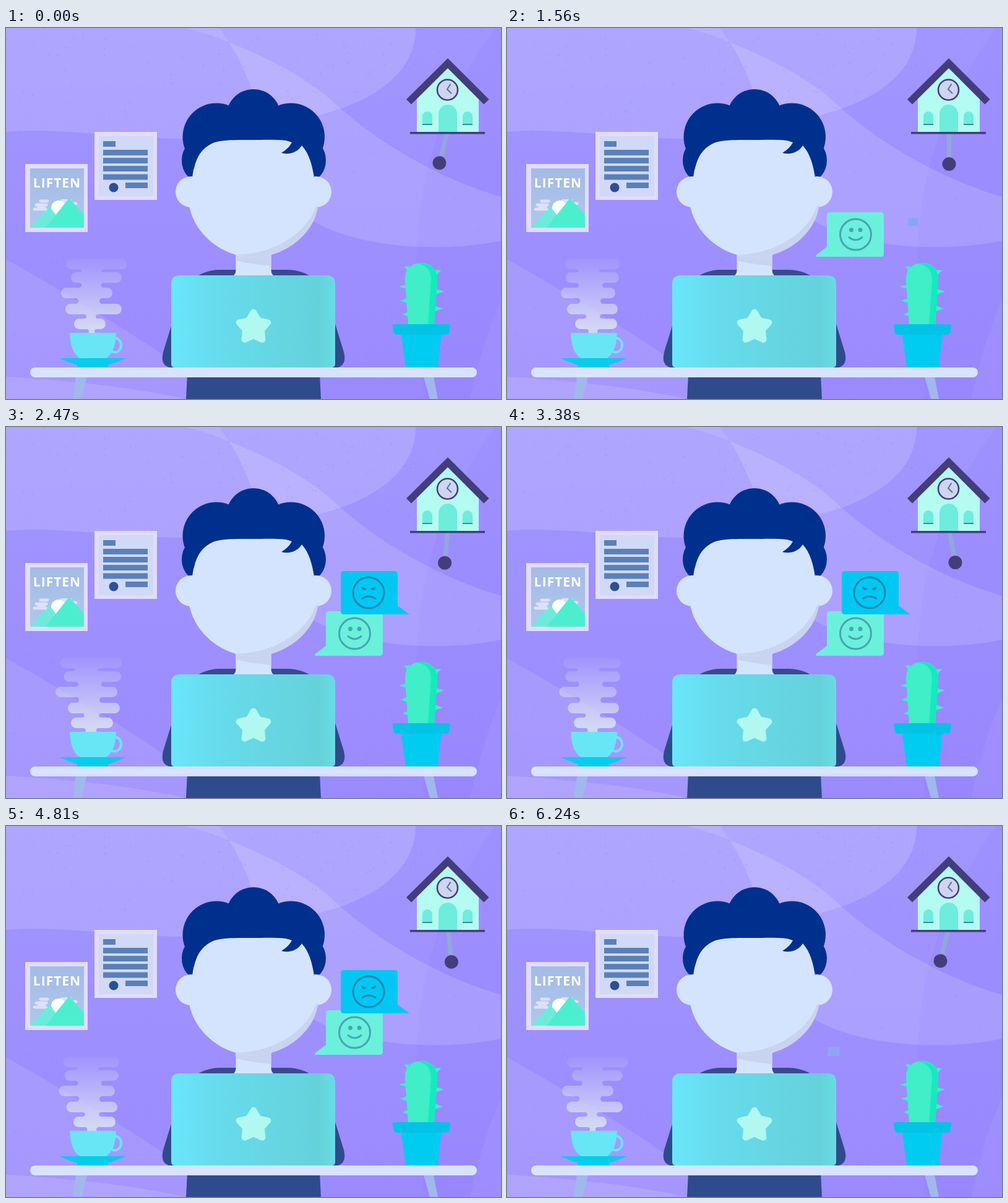
These frames come from a looping animation (800 px wide and 600 px high, 6370 ms). An HTML page:

```html
<!DOCTYPE html>
<html lang="en">
<head>
<meta charset="utf-8">
<title>At the desk</title>
<style>
html, body { margin: 0; width: 100%; height: 100%; overflow: hidden; background: #a093ff; }
svg { display: block; width: 100vw; height: 100vh; }
.poster { font: 700 21px "Open Sans", "Noto Sans", sans-serif; letter-spacing: 1px; fill: #fff; }
</style>
</head>
<body>
<svg viewBox="0 0 800 600">
  <defs>
    <linearGradient id="wall" x2="0" y2="1">
      <stop stop-color="#a196ff"/><stop offset="1" stop-color="#9b8aff"/>
    </linearGradient>
    <linearGradient id="lid">
      <stop stop-color="#6ae6fa"/><stop offset=".3" stop-color="#66dbec"/>
      <stop offset=".9" stop-color="#65d2da"/><stop offset="1" stop-color="#69dbe4"/>
    </linearGradient>
    <linearGradient id="vapour" gradientUnits="userSpaceOnUse" x1="0" y1="372" x2="0" y2="484">
      <stop stop-color="#d2d6f6" stop-opacity=".06"/><stop offset="1" stop-color="#d2d7f3"/>
    </linearGradient>
    <linearGradient id="sky" x2="0" y2="1">
      <stop stop-color="#a3bbe6"/><stop offset="1" stop-color="#b0c6ec"/>
    </linearGradient>
    <clipPath id="face"><path id="jaw" d="M302 235L295 280C300 330 347 370.500 400 370.500C453 370.500 500 330 505 280L498 235C490 170 310 170 302 235Z"/></clipPath>
  </defs>

  <!-- wall -->
  <rect width="800" height="600" fill="url(#wall)"/>
  <path d="M790 0C715 105 658 235 664 400L675 600H800V0Z" fill="#8068ff" opacity=".12"/>
  <g fill="#fff">
    <path opacity=".15" d="M0 0H662C662 70 600 112 530 134C480 148 400 179 285 179C180 178 80 160 0 168Z"/>
    <path opacity=".14" d="M360 23C440 55 500 90 540 130C620 200 720 250 800 273V344C700 365 560 355 490 308C430 240 410 95 360 23Z"/>
    <path opacity=".1" d="M290 0H345L360 23Q330 10 290 0ZM0 374C90 425 200 490 270 540L330 600H0Z"/>
    <path opacity=".12" d="M0 564C100 570 200 580 290 600H0Z"/>
    <path opacity=".05" d="M800 440Q772 500 750 600H800Z"/>
  </g>
  <path id="specks" fill="none" stroke="#7f72e8" stroke-width="1.500" stroke-linecap="round" opacity=".2"/>

  <!-- framed certificate -->
  <path d="M143 168h101v110h-101z" fill="#e2dcfc"/>
  <path d="M150 175h88v97h-88z" fill="#d0d9f5"/>
  <path d="M157 183h20v9h-20zM157 197h72v9h-72zM157 210h72v9h-72zM157 223h72v9h-72zM157 236.500h72v9h-72zM193 250h36v9h-36z" fill="#5b80b9"/>
  <circle cx="174" cy="258" r="7.500" fill="#2d4f94"/>

  <!-- framed poster -->
  <path d="M31 220h101v110h-101z" fill="#e2dcfc"/>
  <path d="M39 227h87v96h-87z" fill="url(#sky)"/>
  <text class="poster" x="82.500" y="258" text-anchor="middle">LIFTEN</text>
  <path d="M90 279.500h14M87 284h26" stroke="#dde0f6" stroke-width="5" stroke-linecap="round"/>
  <circle cx="85" cy="291" r="12" fill="#fff"/>
  <path d="M39 323L70 288L96 323Z" fill="#6eeadb"/>
  <path d="M56 280h11M49 286h16M46 293h18M53 289h9" stroke="#dde0f6" stroke-width="5" stroke-linecap="round"/>
  <path d="M64 323L102 275L126 302V323Z" fill="#4befcf"/>

  <!-- cuckoo clock -->
  <g id="pendulum">
    <path d="M714.500 164V212" stroke="#91a8da" stroke-width="7"/>
    <circle cx="714.500" cy="220" r="11" fill="#443d7c"/>
  </g>
  <path d="M664 169V112L714 62L764 112V169Z" fill="#b4fbf1"/>
  <path d="M651 119.500L714 57L776.500 119.500" fill="none" stroke="#443d7c" stroke-width="11.500"/>
  <path d="M653 169.700H774" stroke="#443d7c" stroke-width="3.500"/>
  <path d="M699 168V139a15 15 0 0 1 30 0V168ZM673 156V143a8 8 0 0 1 16 0V156ZM738 156V143a8 8 0 0 1 16 0V156Z" fill="#6eeddc"/>
  <path d="M673 156h16M738 156h16" stroke="#3b8b9a" stroke-width="2"/>
  <circle cx="713.500" cy="100" r="16.500" fill="#cfd5f1" stroke="#443d7c" stroke-width="2.500"/>
  <path d="M718.500 90.500L713 99L720 106" fill="none" stroke="#5c78ad" stroke-width="2.200"/>

  <!-- table legs and torso -->
  <path d="M113 564H131L122 600H108ZM675 564H691L698 600H685Z" fill="#a0b8ec"/>
  <path d="M293 560H507L509 600H291Z" fill="#2f4b8c"/>
  <path d="M296 410Q320 391 345 391H455Q482 391 504 410V430H296Z" fill="#394a8b"/>
  <path id="arm" d="M280 440L254 524Q248 549 270 550H290Z" fill="#2e4b8c"/>
  <use href="#arm" transform="matrix(-1 0 0 1 800 0)"/>

  <!-- head -->
  <path d="M371.500 350H428.500V392Q429 400 436 402H364Q371 400 371.500 392Z" fill="#d4e4ff"/>
  <path d="M371.500 364H428.500V385Q395 382 371.500 376Z" fill="#c9d4f0"/>
  <g fill="#00308d">
    <circle cx="400" cy="143" r="44"/>
    <circle cx="340" cy="176" r="54.500"/><circle cx="460.500" cy="176" r="54.500"/>
    <ellipse cx="312" cy="214" rx="28" ry="34"/><ellipse cx="489" cy="214" rx="28" ry="34"/>
    <path d="M350 130H450L480 230H320Z"/>
  </g>
  <g fill="#d4e4ff">
    <circle cx="299" cy="265" r="25"/><circle cx="501" cy="265" r="25"/>
    <path d="M302 243C304 216 312 195 337 185C352 180 380 181 400 181C420 181 450 179 478 186C492 200 496 222 498 243L505 280H295Z"/>
    <use href="#jaw" clip-path="url(#low)"/>
    <path d="M295 275C300 330 347 370.500 400 370.500C453 370.500 500 330 505 275Z"/>
  </g>
  <path d="M504.500 286C500 331 453 370.500 400 370.500Q386 370.500 372 366C425 368 485 335 500 290Z" fill="#c9d4f0"/>
  <path d="M440 180Q452 181 462 185Q457 195 445 202C459 206 472 200 478 190C490 203 495 222 498 242L506 200L480 170Z" fill="#00308d"/>

  <!-- cactus -->
  <g fill="#40eec8">
    <path d="M652 385L643 386Q648 389 648 395ZM648 415L635 418L648 422ZM648 437L637 441L649 445ZM650 459L641 463L651 467ZM694 391L704 392Q698 395 696 400ZM694 422L708 426L694 431ZM693 449L706 454L693 458Z"/>
    <path d="M650 480L645 408C644 391 655 380 671 380C687 380 698 391 697 408L692 480Z"/>
  </g>
  <path d="M663 381C684 378 698 390 697 408L692 480H682L687 408C687 392 680 383 663 381Z" fill="#12ebbd"/>
  <path d="M638 490H704L698 549H646Z" fill="#00cbf0"/>
  <path d="M628 479H714Q719 479 718 484L716 493Q715 496 711 496H632Q628 496 627 493L625 484Q624 479 628 479Z" fill="#02c3e6"/>

  <!-- coffee -->
  <path id="steam" fill="url(#vapour)"/>
  <ellipse cx="176" cy="513" rx="10" ry="11.500" fill="none" stroke="#69e6f5" stroke-width="4"/>
  <path d="M103 493H178C177 515 172 528 160 535H121C109 528 104 515 103 493Z" fill="#69e6f5"/>
  <path d="M86 534H194Q176 542 165 545V550H115V545Q104 542 86 534Z" fill="#05cdeb"/>

  <!-- laptop and table -->
  <path d="M281 400H518Q532 400 532 414V543Q532 549 526 549H273Q267 549 267 543V414Q267 400 281 400Z" fill="url(#lid)"/>
  <path id="star" fill="#b0f8f0" stroke="#b0f8f0" stroke-width="10" stroke-linejoin="round"/>
  <rect x="39" y="549" width="722" height="16" rx="8" fill="#d7e3ff"/>

  <!-- chat bubbles -->
  <g id="happy">
    <path d="M523 298H604Q609 298 609 303V365Q609 370 604 370H501Q497 369 501 366L517 354V303Q517 298 523 298Z" fill="#6bf0dc"/>
    <g fill="none" stroke="#49a4b4" stroke-width="3" stroke-linecap="round">
      <circle cx="563.500" cy="334" r="25"/>
      <path d="M553 338.500Q563.500 347 574 338.500"/>
    </g>
    <path d="M553 326.500a3.500 3.500 0 1 1 7 0a3.500 3.500 0 1 1 -7 0M567.500 326.500a3.500 3.500 0 1 1 7 0a3.500 3.500 0 1 1 -7 0" fill="#49a4b4"/>
  </g>
  <g id="sad">
    <path d="M546 233H628Q633 233 633 238V289L652 303H546Q541 303 541 298V238Q541 233 546 233Z" fill="#00c8f2"/>
    <g fill="none" stroke="#2387b4" stroke-width="3" stroke-linecap="round">
      <circle cx="586" cy="268" r="25"/>
      <path d="M575.500 277.500Q586 270.500 597 277.500"/>
    </g>
    <path d="M574 258L583 261.500Q579 266 575.500 262.500ZM598 258L589 261.500Q593 266 596.500 262.500Z" fill="#2387b4"/>
  </g>
</svg>
<script>
const LOOP = 6370, STEP = 130;
const get = id => document.getElementById(id);
const mix = (a, b, k) => a + (b - a) * k;
const clamp = v => Math.min(1, Math.max(0, v));

// Puff poses: left, right, neck left, neck right for each row.
const rest = [[97, 196, 118, 158], [105, 187, 118, 158], [89, 172, 113, 155], [96, 187, 126, 149], [110, 161, 130, 147]];
const wide = [[86, 188, 107, 152], [93, 187, 113, 158], [78.5, 181, 114, 155], [100.5, 185, 122, 154], [104, 172, 124, 150]];
const slim = [[94, 182, 112, 153], [95, 181, 112, 158], [87, 175, 114, 155], [97, 179, 124, 154], [110, 178, 128, 150]];
const poses = [rest, wide, slim, wide, slim, wide, slim, wide, rest];
const tops = [373, 395, 420, 446, 470, 494];
const puff = 17;

function steamPath(t) {
  const p = t / 780, i = Math.min(7, Math.floor(p));
  const rows = poses[i].map((row, r) => row.map((v, c) => mix(v, poses[i + 1][r][c], p - i)));
  let down = `M${rows[0][0] + 8} ${tops[0]}`, up = '';
  rows.forEach(([l, r, nl, nr], n) => {
    const gap = tops[n + 1] - tops[n] - puff;
    down += `H${r - 8}a8 8.5 0 0 1 0 ${puff}H${nr}a4 ${gap / 2} 0 0 0 0 ${gap}`;
    up = `H${nl}a4 ${gap / 2} 0 0 0 0 ${-gap}H${l + 8}a8 8.5 0 0 1 0 ${-puff}` + up;
  });
  return down + up + 'Z';
}

function pop(id, t, start, end, x, y) {
  const s = clamp(Math.min((t - start) / 360, (end - t) / 360));
  const g = get(id);
  g.setAttribute('transform', `translate(${x} ${y}) scale(${s}) translate(${-x} ${-y})`);
  g.setAttribute('opacity', clamp(s * 1.3));
}

function drawStatic() {
  let star = '';
  for (let i = 0; i < 10; i++) {
    const r = i % 2 ? 13.5 : 24.5, a = i * Math.PI / 5;
    star += `${i ? 'L' : 'M'}${400 + r * Math.sin(a)} ${484 - r * Math.cos(a)}`;
  }
  get('star').setAttribute('d', star + 'Z');

  let seed = 7, specks = '';
  const rnd = n => (seed = seed * 16807 % 2147483647) / 2147483647 * n;
  for (let i = 0; i < 200; i++) specks += `M${rnd(800)} ${i % 2 ? rnd(140) : rnd(600)}l${rnd(3)} ${rnd(2)}`;
  get('specks').setAttribute('d', specks);
}

function frame(now) {
  const t = Math.floor(now % LOOP / STEP) * STEP;
  const swing = 14.5 * Math.cos(t / 2080 * 2 * Math.PI);
  get('pendulum').setAttribute('transform', `rotate(${swing} 714.5 164)`);
  get('steam').setAttribute('d', steamPath(t));
  pop('happy', t, 630, 6310, 520, 372);
  pop('sad', t, 1495, 5445, 671.5, 324);
}

drawStatic();
const begin = performance.now();
(function tick() {
  frame(performance.now() - begin);
  requestAnimationFrame(tick);
})();
</script>
</body>
</html>
```
